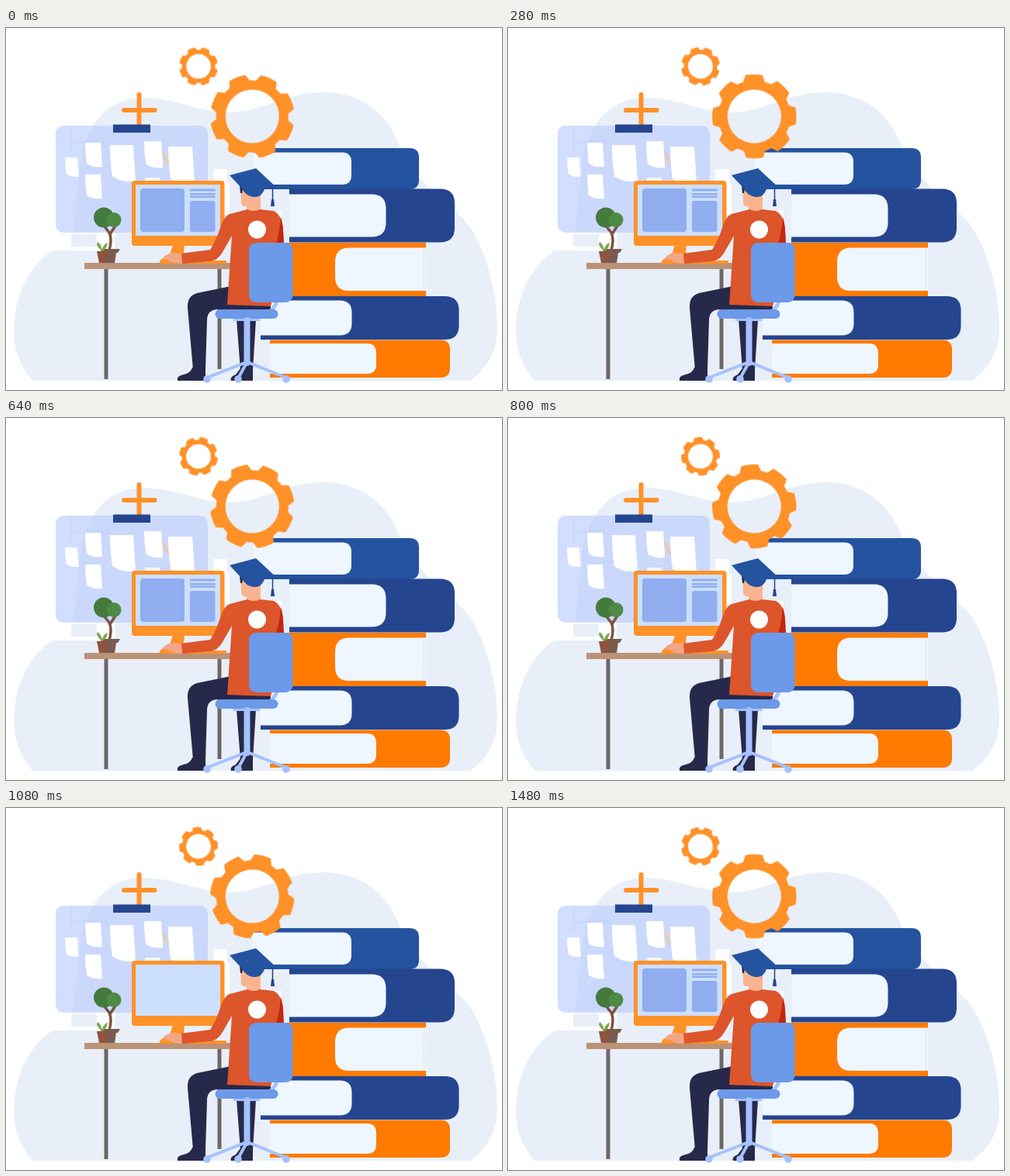
Animation of 639 by 467 pixels, one loop 1.52 s. Source, as an HTML page without scripts:

```html
<!DOCTYPE html>
<html lang="en">
<head>
<meta charset="utf-8">
<title>Study desk</title>
<style>
html, body { margin: 0; width: 100%; height: 100%; overflow: hidden; background: #fff; }
svg { display: block; width: 639px; height: 467px; }
.navy { fill: #25458f; }
.blue { fill: #2453a0; }
.orange { fill: #ff7a00; }
.amber { fill: #ff9129; }
.page { fill: #eef6ff; }
.paper { fill: #fff; }
.haze { fill: #e8eff8; }
.pants { fill: #27294a; }
.skin { fill: #f9b48f; }
.chair { fill: #6c99e8; }
.frame { fill: none; stroke: #a6c1fd; stroke-linecap: round; }
.turn { animation: turn 1520ms steps(38) infinite; }
.turn.back { animation-name: turn-back; }
.window { fill: #90aef0; animation: blink 1520ms step-end infinite; }
@keyframes turn {
  from { transform: rotate(1deg); }
  to { transform: rotate(115deg); }
}
@keyframes turn-back {
  from { transform: rotate(0deg); }
  to { transform: rotate(-228deg); }
}
@keyframes blink {
  0%, 39.4%, 73.6% { opacity: 1; }
  21%, 57.8% { opacity: 0; }
}
</style>
</head>
<body>
<svg viewBox="0 0 639 467" xmlns="http://www.w3.org/2000/svg">
  <defs>
    <path id="tooth" d="M-14-44L-11-53.2Q0-55.200 11-53.200L14-44Z"/>
    <g id="pair"><use href="#tooth"/><use href="#tooth" transform="rotate(180)"/></g>
    <g id="quad"><use href="#pair"/><use href="#pair" transform="rotate(90)"/></g>
    <g id="gear" class="amber">
      <circle r="40.5" fill="none" stroke="#ff9129" stroke-width="12"/>
      <use href="#quad" transform="rotate(22.5)"/>
      <use href="#quad" transform="rotate(-22.5)"/>
    </g>
    <path id="sheet" d="M0 0H20L22 31Q14 32 8 30L2 27Q0 14 0 0Z"/>
  </defs>

  <!-- backdrop -->
  <path class="haze" d="M34 455C14 430 8 408 11 377C14 340 32 305 60 287H84L97 165C108 118 134 90 178 90C222 91 248 109 289 109C331 108 360 83 409 83C460 83 492 113 506 150C520 190 560 218 590 247C617 278 633 340 633 387C633 418 619 440 598 455Z"/>
  <path class="paper" d="M78 262H140V287H78ZM267 182H285V210H267ZM281 200H288V240H281Z"/>
  <path class="haze" d="M84 266H117V282H84Z"/>

  <!-- board -->
  <rect x="64" y="126" width="196" height="138" rx="10" fill="#bacdff" opacity=".65"/>
  <path fill="#bfcff9" opacity=".35" d="M83 126H86V145H131V150H86V160H83Z"/>
  <path d="M200 157Q209 163 211 180L204 171Z" fill="#e8c9bd"/>
  <g class="paper">
    <use href="#sheet" x="102" y="148"/>
    <use href="#sheet" x="102" y="189"/>
    <use href="#sheet" transform="translate(134 151) scale(1.5)"/>
    <use href="#sheet" transform="translate(178 146) scale(1.1)"/>
    <use href="#sheet" transform="translate(209 153) scale(1.55)"/>
    <use href="#sheet" transform="translate(76 167) scale(.8)"/>
    <path d="M179 193H198V200H179Z" opacity=".8"/>
  </g>
  <path d="M171.500 86V124M152 106H191.500" stroke="#ff9129" stroke-width="6" stroke-linecap="round"/>
  <rect class="navy" x="138" y="124.500" width="48" height="10.500"/>

  <!-- books -->
  <path class="blue" d="M318 155H520Q532 155 532 167V196Q532 208 520 208H318Z"/>
  <path class="page" d="M318 160.500H433Q445 160.500 445 173V190Q445 202 433 202H318Z"/>
  <path class="haze" d="M331 208H365V277H331Z"/>
  <path class="paper" d="M331 236H355V262H331Z"/>
  <path class="navy" d="M365 207.500H559Q578 207.500 578 226V258Q578 276.500 559 276.500H365Z"/>
  <path class="page" d="M365 214.500H471Q489.500 214.500 489.500 233V251Q489.500 269.500 471 269.500H365Z"/>
  <path class="orange" d="M340 277H541V346H340Z"/>
  <path class="page" d="M541 283.500H442Q424 283.500 424 302V321Q424 339 442 339H541Z"/>
  <path d="M538.500 283.500V339" stroke="#dce5ee"/>
  <path class="navy" d="M328 346H565Q583.500 346 583.500 364V384Q583.500 402 565 402H328Z"/>
  <path class="page" d="M328 351.500H430Q445.500 351.500 445.500 367V381Q445.500 396.500 430 396.500H328Z"/>
  <path class="orange" d="M340 402.500H560Q572 402.500 572 415V439Q572 451 560 451H340Z"/>
  <path class="page" d="M340 407H465Q477 407 477 420V434Q477 446 465 446H340Z"/>

  <!-- gears -->
  <g transform="translate(317.300 114)"><g class="turn"><use href="#gear"/></g></g>
  <g transform="translate(248 49.500) scale(.46)"><g class="turn back"><use href="#gear"/></g></g>

  <!-- desk -->
  <path fill="#6f6766" d="M126.500 311H131.500V453H126.500ZM272.500 311H277.500V440H272.500Z"/>
  <rect x="101" y="303" width="199" height="8" fill="#bb9276"/>

  <!-- plants -->
  <path fill="none" stroke="#7f5140" stroke-width="3.500" d="M133 287Q137 272 133 264L126 255M134 266L141 255"/>
  <g fill="#447a3c">
    <circle cx="126" cy="244.500" r="13"/>
    <circle cx="139" cy="247.500" r="9.500" fill="#4d8a44"/>
  </g>
  <path fill="#7b5b4e" d="M122 285H147L144 290H142L140 303H126Z"/>
  <path fill="#79a84e" d="M123 287Q115 281 118 276Q124 280 123 287Q126 278 131 277Q130 285 124 288Z"/>
  <path fill="#8f5440" d="M117 288H131L128 303H120Z"/>

  <!-- monitor -->
  <path class="amber" d="M215 280H230L228 300H284V304H197Q198 296 210 295Z"/>
  <rect class="amber" x="162" y="197" width="119.500" height="84" rx="4"/>
  <rect x="167" y="202" width="109" height="66" fill="#cddffe"/>
  <g class="window">
    <rect x="173" y="207" width="57" height="56" rx="4"/>
    <rect x="237" y="223" width="32.500" height="40" rx="3"/>
    <path d="M237 207.500H269.500V210.500H237ZM237 213H269.500V215.500H237ZM237 216.500H269.500V219H237Z"/>
  </g>

  <!-- student -->
  <path class="pants" d="M290 333L246 342Q233 346 234 361L241 441H257L259 377Q259 364 272 363H341V352ZM297 376H322L318 441H302Z"/>
  <path class="pants" d="M240 438H257V455H221Q219 449 229 447Q238 445 240 438ZM302 439H318V455H290Q288 450 296 447Z"/>
  <path class="skin" d="M302 200H328V237H310V230Q303 231 303 225Z"/>
  <path class="pants" d="M301 203H306L304 213H302Z"/>
  <path class="blue" d="M288 190L322 181L350 207L333 208Q329 219 319 218Q309 217 303 206Z"/>
  <path d="M343.500 206V223" stroke="#24407f" stroke-width="1.500"/>
  <path class="navy" d="M342 221H345L346 230H341Z"/>
  <path fill="#dc552b" d="M288 240L311 234Q319 238 327 234L345 236Q355 241 357 258L358 300L341 359L285 357L291 268L279 289Q273 300 262 301L227 304L225 291L263 286Q271 274 277 255Q281 243 288 240Z"/>
  <path fill="#c4260f" d="M354 244Q357 252 358 278H348Q353 262 354 244Z"/>
  <path fill="#f3a686" d="M226 291L213 290Q203 293 202 298L209 299Q214 304 227 304Z"/>
  <circle class="paper" cx="323.500" cy="260" r="11.500"/>

  <!-- chair -->
  <path class="frame" stroke-width="5" d="M350 350Q347 360 340 366"/>
  <rect class="chair" x="313" y="277" width="56.500" height="77" rx="9"/>
  <rect class="chair" x="269.500" y="363" width="81" height="12" rx="6"/>
  <path class="frame" stroke-width="3" d="M294 376.500H326"/>
  <path class="frame" stroke-width="8" stroke-linecap="butt" d="M310.500 377V432"/>
  <path class="frame" stroke-width="4" d="M259 451L310.500 431L361 451M310.500 431L299 452"/>
  <g fill="#a6c1fd">
    <circle cx="259" cy="453" r="4.800"/>
    <circle cx="299" cy="453" r="4.800"/>
    <circle cx="361" cy="453" r="4.800"/>
  </g>
</svg>
</body>
</html>
```
